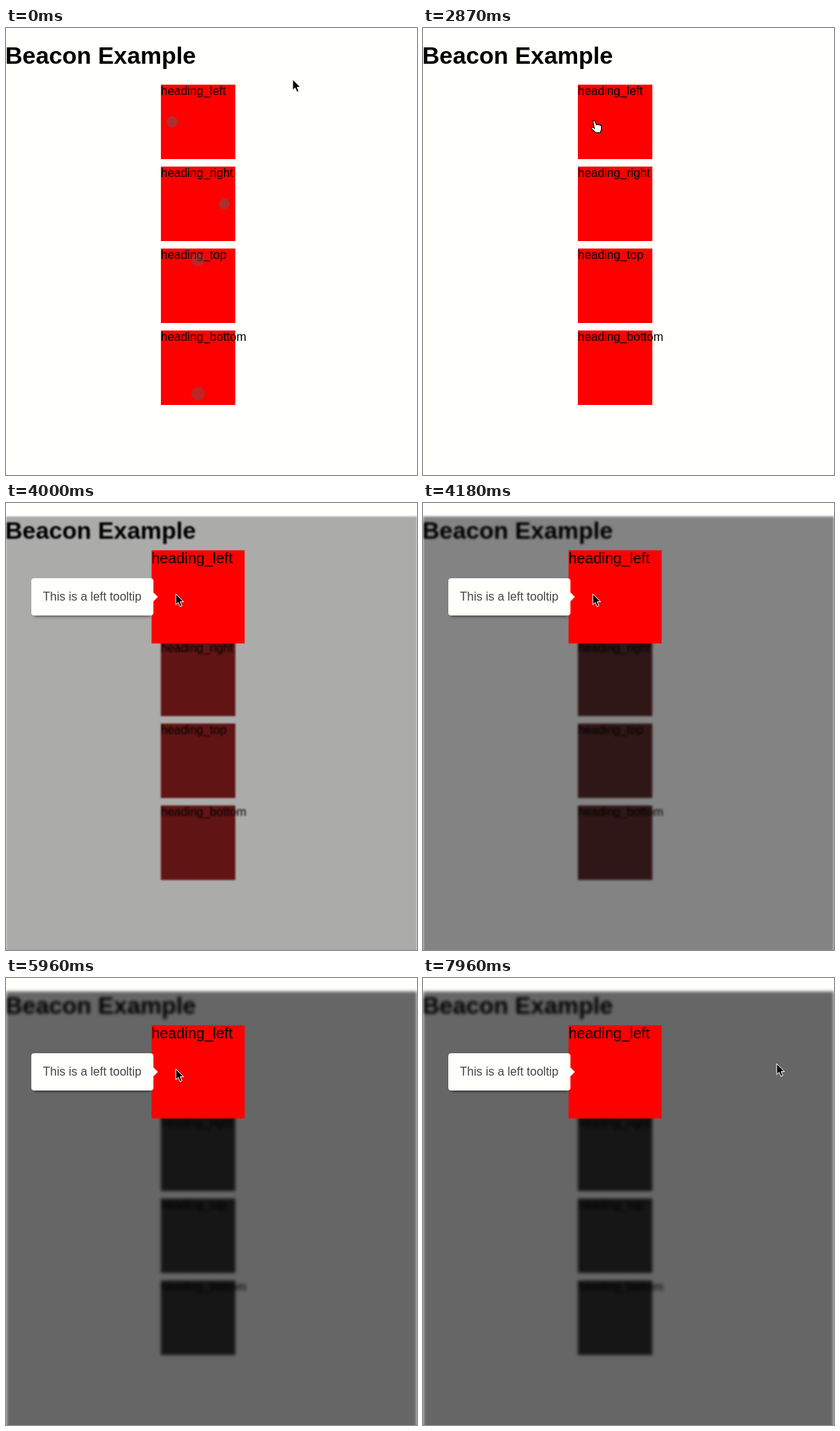
Animation, 552 px wide and 600 px high, one loop 8000 ms. Source, as an HTML page:

```html
<!DOCTYPE html>
<html lang="en">
<head>
<meta charset="utf-8">
<title>Beacon Example</title>
<style>
  html, body { margin: 0; width: 100%; height: 100%; overflow: hidden; background: #fffffc; }
  body { font: 16px "Liberation Sans", Arial, sans-serif; color: #000; }
  #stage { position: relative; width: 552px; height: 600px; overflow: hidden; background: #fffffc; }
  #stage * { position: absolute; margin: 0; white-space: nowrap; }
  #page { left: 0; top: 18px; width: 552px; height: 640px; background: #fffffc; }
  h1 { left: -1px; top: 1px; font-size: 32px; line-height: 37px; }
  .box { left: 208px; width: 100px; height: 100px; background: #f00; line-height: 18px; }
  .beacon { width: 30px; height: 30px; border-radius: 50%; background: #5f5f5f; }
  #tip { left: 34px; top: 101px; width: 164px; height: 50px; border-radius: 4px; background: #fffffc;
    color: #444; line-height: 50px; text-indent: 15.5px; box-shadow: 0 5px 4px -4px rgba(0, 0, 0, .6); }
  #tip::after { content: ""; position: absolute; left: 100%; top: 19px;
    border: 6px solid transparent; border-left-color: #fffffc; border-right-width: 0; }
  #cursor { left: 0; top: 0; overflow: visible; }
</style>
</head>
<body>
<div id="stage">
  <div id="page"><h1>Beacon Example</h1></div>
  <div id="target" class="box" style="top:76px">heading_left</div>
  <div id="tip">This is a left tooltip</div>
  <svg id="cursor" width="18" height="20">
    <path id="arrow" d="M0 0V14.5L3.3 11.5L5.8 17L8.3 16L6 10.6H10.5Z" fill="#000" stroke="#fff" stroke-width="1"/>
    <path id="hand" d="M.3 3Q1.2 1.4 2.8 2.8L5 8Q6.5 6.5 7.7 8Q9 7 10 8.7Q11.6 8.4 11.7 10.5V14L10.2 18.5H4L-.5 14.5Q-2.6 12.4-1.5 11.4Q0 10.8 2.2 12.7Z"
      fill="#fff" stroke="#000" stroke-width="1.1"/>
  </svg>
</div>
<script>
const LOOP = 8000, CLICK = 2800, OPEN = 3470;
const $ = id => document.getElementById(id);
const page = $('page'), target = $('target'), tip = $('tip');
const cursor = $('cursor'), arrow = $('arrow'), hand = $('hand');

function add(parent, cls, left, top, text = '') {
  const el = document.createElement('div');
  el.className = cls;
  el.textContent = text;
  el.style.left = left + 'px';
  el.style.top = top + 'px';
  parent.append(el);
  return el;
}

['right', 'top', 'bottom'].forEach((side, i) =>
  add(page, 'box', 208, 168 + i * 110, 'heading_' + side));

// position and phase of each beacon
const beacons = [[0, 35, .5], [70, 145, .5], [35, 220, .56], [35, 400, .56]]
  .map(([x, y, phase]) => ({ el: add($('stage'), 'beacon', 208 + x, 76 + y), phase }));
$('stage').append(cursor);

const clamp = v => Math.min(1, Math.max(0, v));
const ease = v => (1 - Math.cos(Math.PI * clamp(v))) / 2;

// time, x, y
const path = [
  [0, 385, 69], [120, 385, 69], [860, 341, 88], [1700, 304, 105],
  [2500, 228, 122], [6200, 228, 122], [7400, 475, 115], [LOOP, 475, 115]
];

function cursorAt(t) {
  const i = path.findIndex((p, k) => k > 0 && t <= p[0]);
  const [t0, x0, y0] = path[i - 1], [t1, x1, y1] = path[i];
  const raw = (t - t0) / (t1 - t0), k = i > 4 ? ease(raw) : raw;
  return [x0 + (x1 - x0) * k, y0 + (y1 - y0) * k];
}

function draw(t) {
  for (const { el, phase } of beacons) {
    const k = ease((t / 1000 + phase) % 1);
    el.style.transform = `scale(${k})`;
    el.style.opacity = t < CLICK ? 1 - k : 0;
  }

  const dim = ease((t - OPEN) / 1000);
  page.style.filter = dim
    ? `grayscale(${dim}) blur(${2 * dim}px) brightness(${1 - .6 * dim})` : 'none';

  const open = ease((t - OPEN) / 500);
  target.style.transform = `scale(${1 + .25 * open})`;
  tip.style.opacity = clamp(open * 1.6);
  tip.style.transform = `translateX(${8 * (1 - open)}px) scale(${.95 + .05 * open})`;

  const [x, y] = cursorAt(t);
  const pointing = t > 2440 && t < 3400;
  cursor.style.transform = `translate(${x}px,${y}px)`;
  arrow.style.display = pointing ? 'none' : '';
  hand.style.display = pointing ? '' : 'none';
}

const start = performance.now();
function tick() {
  draw((performance.now() - start) % LOOP);
  requestAnimationFrame(tick);
}
tick();
</script>
</body>
</html>
```
